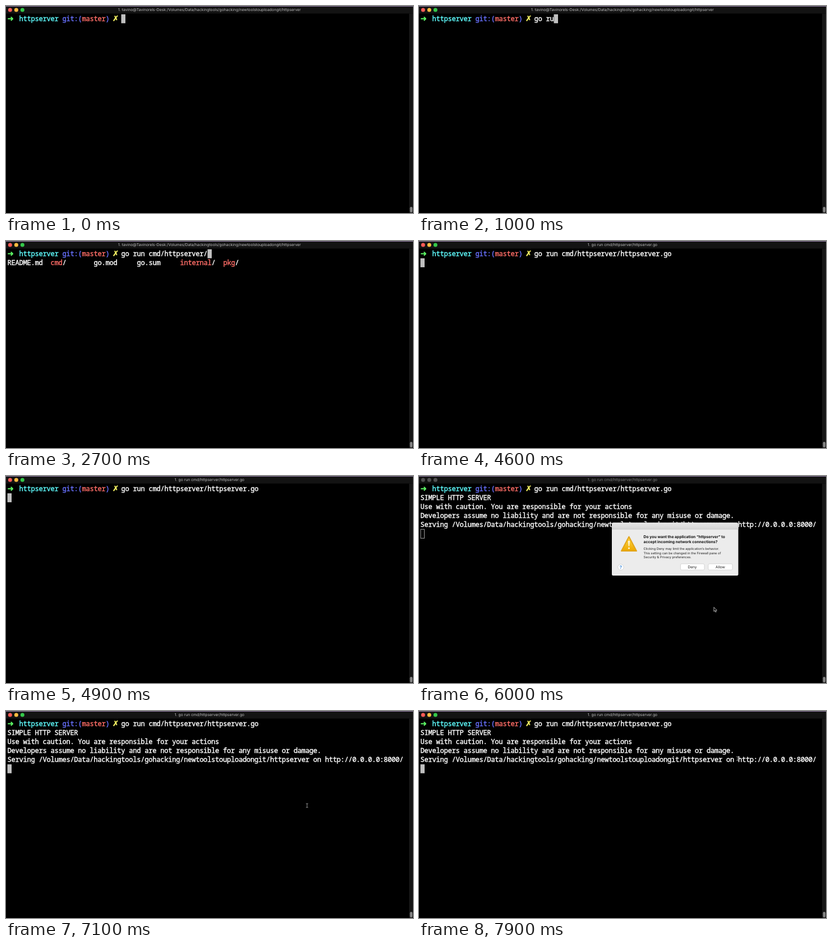
Write an HTML page that moves like this. It is 726 by 370 pixels and loops after 8 s.

```html
<!DOCTYPE html>
<html lang="en">
<head>
<meta charset="utf-8">
<title>Terminal session</title>
<style>
  html, body { margin: 0; width: 100%; height: 100%; overflow: hidden; background: #000; }
  svg { display: block; width: 726px; height: 370px; }
  text { white-space: pre; }
  .mono {
    font: 500 12.2px "Noto Sans Mono", "DejaVu Sans Mono", monospace; letter-spacing: -.32px;
    color: #fff; fill: currentColor; stroke: currentColor; stroke-width: .4px;
  }
  .sign { font: 700 13.5px "DejaVu Sans", sans-serif; letter-spacing: 0; }
  .ui { font-family: Inter, "Open Sans", sans-serif; text-rendering: geometricPrecision; }
  .cyan { color: #5ffdff; }
  .blue { color: #6871ff; }
  .red { color: #ff6d67; }
  .green { color: #5ff967; }
  .yellow { color: #fefb67; }
  #title { font-size: 6.83px; fill: #c0c0c0; }
  .idle #title { fill: #808080; }
  .idle #lights circle { fill: #505050; }
</style>
</head>
<body>
<svg id="stage" viewBox="0 0 726 370">
  <defs>
    <linearGradient id="warn" x2="0" y2="1">
      <stop stop-color="#ffd94a"/><stop offset="1" stop-color="#eda800"/>
    </linearGradient>
    <linearGradient id="strip" x2="0" y2="1">
      <stop stop-color="#e6e6e6"/><stop offset="1" stop-color="#d4d4d4"/>
    </linearGradient>
    <filter id="shadow" x="-10%" y="-10%" width="120%" height="130%">
      <feDropShadow dx="0" dy="2" stdDeviation="3" flood-opacity=".5"/>
    </filter>
  </defs>

  <rect width="726" height="370"/>
  <rect width="726" height="13.5" fill="#131313"/>
  <rect width="726" height="1" fill="#9480a8"/>
  <g id="lights">
    <circle cx="7.3" cy="7" r="3.5" fill="#fc5b57"/>
    <circle cx="18.3" cy="7" r="3.5" fill="#fdbc40"/>
    <circle cx="29.3" cy="7" r="3.5" fill="#34c84a"/>
  </g>
  <text id="title" class="ui" x="363" y="9.2" text-anchor="middle"></text>
  <g id="bell" fill="#e9b93c">
    <path d="M527 9.3q1.3-1 1.3-3.1q.2-2.4 2.2-2.5q2 .1 2.2 2.5q0 2.1 1.3 3.1z"/>
    <circle cx="530.5" cy="10" r=".9"/>
  </g>
  <rect x="719" y="13.5" width="7" height="356.5" fill="#161616"/>
  <rect x="720.5" y="359" width="4.5" height="10" rx="2.2" fill="#858585"/>

  <g id="prompt"></g>
  <text id="command" class="mono"></text>
  <g id="listing"></g>
  <g id="output"></g>
  <rect id="caret" height="16"/>

  <g id="dialog" class="ui">
    <rect x="344" y="83.5" width="225.5" height="94.5" rx="2.5" fill="#ececec" filter="url(#shadow)"/>
    <path d="M344 95V86q0-2.5 2.5-2.5h220.5q2.5 0 2.5 2.5v9z" fill="url(#strip)"/>
    <path d="M344 95.2h225.5" stroke="#bcbcbc" stroke-width=".6"/>
    <path d="M374.5 108.5L388 134H361z" fill="url(#warn)" stroke="#e2a51c" stroke-width="2" stroke-linejoin="round"/>
    <path d="M373 116h3l-.8 9.5h-1.4z" fill="#fff8df"/>
    <circle cx="374.5" cy="129" r="1.6" fill="#fff8df"/>
    <g font-size="6.87" font-weight="700" fill="#111">
      <text x="400.5" y="111.2">Do you want the application “httpserver” to</text>
      <text x="400.5" y="120.3">accept incoming network connections?</text>
    </g>
    <g font-size="5.74" fill="#222">
      <text x="400.5" y="132.2">Clicking Deny may limit the application’s behavior.</text>
      <text x="400.5" y="139.7">This setting can be changed in the Firewall pane of</text>
      <text x="400.5" y="147.2">Security &amp; Privacy preferences.</text>
    </g>
    <g fill="#fff" stroke="#c2c2c2" stroke-width=".6">
      <rect x="466.5" y="157" width="42.5" height="11" rx="2"/>
      <rect id="allow" x="516" y="157" width="43" height="11" rx="2"/>
      <circle cx="360" cy="163" r="5.2"/>
    </g>
    <g font-size="6.6" fill="#222" text-anchor="middle">
      <text x="487.5" y="164.9">Deny</text>
      <text x="537.5" y="164.9">Allow</text>
      <text x="360" y="165.8" font-size="8" font-weight="600" fill="#2f7fd6">?</text>
    </g>
  </g>

  <path id="arrow" d="M0 0V7.6L1.8 6L3 8.8L4.3 8.2L3.1 5.6H5.4z" fill="#000" stroke="#ddd" stroke-width=".8"/>
  <path id="beam" d="M-1.8-3.7Q0-3.7 0-2.5Q0-3.7 1.8-3.7M0-2.8V2.8M-1.8 3.7Q0 3.7 0 2.5Q0 3.7 1.8 3.7" fill="none" stroke="#b0b0b0" stroke-width=".8"/>
</svg>

<script>
const LOOP = 8000, STEP = 100;
const $ = id => document.getElementById(id);
const colX = col => 2.5 + 7 * col;
const rowY = row => 27 + 16.1 * row;

function put(parent, row, col, text, cls = '') {
  const node = document.createElementNS('http://www.w3.org/2000/svg', 'text');
  node.setAttribute('class', 'mono ' + cls);
  node.setAttribute('x', colX(col));
  node.setAttribute('y', rowY(row));
  node.textContent = text;
  $(parent).append(node);
}

[
  [0, '➜', 'sign green'], [3, 'httpserver', 'cyan'], [14, 'git:(', 'blue'],
  [19, 'master', 'red'], [25, ')', 'blue'], [26.8, '✗', 'sign yellow']
].forEach(([col, text, cls]) => put('prompt', 0, col, text, cls));

[
  [0, 'README.md'], [11, 'cmd', 'red'], [14, '/'], [22, 'go.mod'], [33, 'go.sum'],
  [44, 'internal', 'red'], [52, '/'], [55, 'pkg', 'red'], [58, '/']
].forEach(([col, text, cls]) => put('listing', 1, col, text, cls));

const folder = '/Volumes/Data/hackingtools/gohacking/newtoolstouploadongit/httpserver';
[
  'SIMPLE HTTP SERVER',
  'Use with caution. You are responsible for your actions',
  'Developers assume no liability and are not responsible for any misuse or damage.',
  `Serving ${folder} on http://0.0.0.0:8000/`
].forEach((line, i) => put('output', i + 1, 0, line));

const command = 'go run cmd/httpserver/httpserver.go';
const shellTitle = '1. tavino@Tavinorels-Desk:' + folder;
const runTitle = '1. ' + command;
$('command').setAttribute('x', colX(29));
$('command').setAttribute('y', rowY(0));

// [time, typed characters]; larger jumps are tab completions
const typing = [
  [0, 0], [400, 1], [500, 2], [700, 3], [900, 4], [1000, 5], [1100, 6], [1300, 7],
  [2000, 8], [2100, 9], [2300, 11], [2500, 12], [2600, 22], [3200, 35]
];
const at = { list: 1500, bellOff: 2000, enter: 4100, output: 5000, ask: 5300, press: 6600, close: 6800 };

// [time, x, y] of the pointer
const pointer = [
  [5600, 505, 366], [6000, 526, 234.5], [6500, 537, 163],
  [7000, 537, 169], [7300, 537, 169], [7900, 568, 85]
];

function pointerAt(t) {
  const i = pointer.findIndex(p => p[0] > t);
  if (i < 0) return pointer.at(-1).slice(1);
  if (i === 0) return pointer[0].slice(1);
  const a = pointer[i - 1], b = pointer[i];
  const k = (t - a[0]) / (b[0] - a[0]);
  const ease = k * k * (3 - 2 * k);
  return [1, 2].map(n => a[n] + (b[n] - a[n]) * ease);
}

const show = (id, on) => $(id).setAttribute('visibility', on ? 'visible' : 'hidden');

function attrs(id, values) {
  for (const name in values) $(id).setAttribute(name, values[name]);
}

function draw(t) {
  const typed = typing.findLast(k => k[0] <= t)[1];
  const running = t >= at.enter;
  const printed = t >= at.output;
  const asking = t >= at.ask && t < at.close;
  const ringing = t >= at.list && t < at.bellOff;

  $('command').textContent = command.slice(0, typed);
  $('title').textContent = running ? runTitle : shellTitle;
  attrs('title', { x: ringing ? 356.5 : 363 });
  show('bell', ringing);
  show('listing', t >= at.list && !running);
  show('output', printed);
  show('dialog', asking);
  attrs('allow', { fill: asking && t >= at.press ? '#4a98f0' : '#fff' });
  $('stage').classList.toggle('idle', asking);

  const row = printed ? 5 : running ? 1 : 0;
  attrs('caret', {
    x: colX(running ? 0 : 29 + typed) + (asking ? .5 : 0),
    y: 14.8 + 16.1 * row,
    width: asking ? 6.5 : 7.5,
    fill: asking ? 'none' : '#c0c0c0',
    stroke: asking ? '#a0a0a0' : 'none'
  });

  const place = { transform: `translate(${pointerAt(t)})` };
  attrs('arrow', place);
  attrs('beam', place);
  show('arrow', t >= pointer[0][0] && t < at.close);
  show('beam', t >= at.close);
}

const start = performance.now();
function tick() {
  const t = (performance.now() - start) % LOOP;
  draw(Math.floor(t / STEP) * STEP);
  requestAnimationFrame(tick);
}
tick();
</script>
</body>
</html>
```
